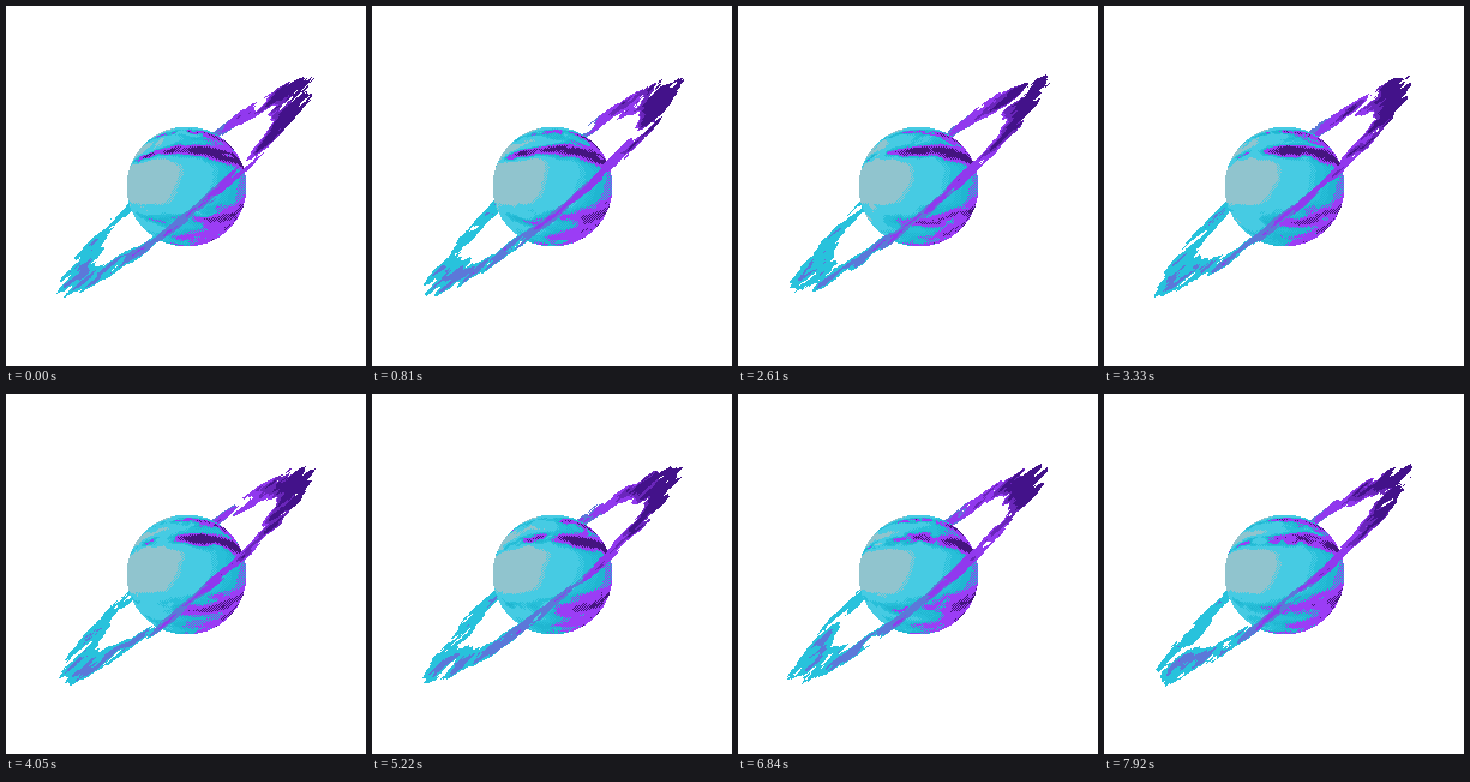
An HTML page with a canvas that plays this animation: 360x360 px, repeating every 8000 ms.

```html
<!DOCTYPE html>
<html lang="en">
<head>
<meta charset="utf-8">
<title>Ringed planet</title>
<style>
  html, body { margin: 0; width: 100%; height: 100%; overflow: hidden; background: #fff; }
  canvas { display: block; width: 360px; height: 360px; image-rendering: pixelated; }
</style>
</head>
<body>
<canvas id="stage" width="300" height="300"></canvas>
<script>
const SIZE = 300, LOOP = 8000, STEP = 90;
const PLANET = { pixels: 100, left: 100, scale: 10, seed: 6.314, drift: 0.8 };
const RING = { tilt: 0.7, width: 0.127, flatten: 6, scale: 15, seed: 8.461, spin: 0.5 };
const LIGHT = { x: -0.1, y: 0.3 };

// Cloud belts: centre, half-width and strength, by latitude from 0 (top) to 1.
const BELTS = [
  [0.17, 0.04, 1.4], [0.25, 0.05, 0.6], [0.332, 0.038, 2.5],
  [0.6, 0.02, 0.3], [0.66, 0.045, 1.05], [0.77, 0.05, 0.7], [0.9, 0.08, 0.6]
];

const rgb = hex => [1, 3, 5].map(i => parseInt(hex.slice(i, i + 2), 16));
const PLANET_COLORS = ['#90c4ce', '#46cbe3', '#28bfd9', '#20b6d1', '#9b3df5', '#45157f'].map(rgb);
const RING_COLORS = ['#28c2dc', '#5c78d9', '#9139ee', '#6a26bb', '#43128a'].map(rgb);

const ctx = document.getElementById('stage').getContext('2d');
const image = ctx.createImageData(SIZE, SIZE);

const fract = v => v - Math.floor(v);
const mod = (v, m) => v - m * Math.floor(v / m);
const smoothstep = (a, b, v) => {
  const t = Math.min(1, Math.max(0, (v - a) / (b - a)));
  return t * t * (3 - 2 * t);
};
const level = (v, limits) => limits.filter(limit => v >= limit).length;

function rotate(x, y, angle) {
  const c = Math.cos(angle), s = Math.sin(angle);
  return [x * c - y * s, x * s + y * c];
}

function makeNoise(scale, seed, octaves) {
  const rand = (x, y) =>
    fract(Math.sin(mod(x, 2 * scale) * 12.9898 + mod(y, scale) * 78.233) * 15.5453 * seed);

  function noise(x, y) {
    const ix = Math.floor(x), iy = Math.floor(y);
    const fx = x - ix, fy = y - iy;
    const u = fx * fx * (3 - 2 * fx), v = fy * fy * (3 - 2 * fy);
    const a = rand(ix, iy), b = rand(ix + 1, iy);
    const c = rand(ix, iy + 1), d = rand(ix + 1, iy + 1);
    return a + (b - a) * u + (c - a) * v * (1 - u) + (d - b) * u * v;
  }

  function fbm(x, y) {
    let sum = 0;
    for (let i = 0, gain = 0.5; i < octaves; i++, gain /= 2, x *= 2, y *= 2) {
      sum += noise(x, y) * gain;
    }
    return sum;
  }
  return { rand, fbm };
}

const clouds = makeNoise(PLANET.scale, PLANET.seed, 3);
const dust = makeNoise(RING.scale, RING.seed, 4);

function swirl(x, y) {
  const row = Math.floor(y);
  x += row * 0.31;
  const h = clouds.rand(Math.floor(x), row);
  const offset = 0.25 + h * 0.5;
  const dist = Math.hypot(fract(x) - offset, fract(y) - offset);
  return smoothstep(0, h * 0.25, dist * 0.75);
}

function turbulence(x, y, shift) {
  const k = PLANET.scale * 0.3;
  let sum = 0;
  for (let i = 11; i <= 20; i++) sum += swirl(x * k + i + shift, y * k + i);
  return sum;
}

const beltStrength = y => BELTS.reduce(
  (sum, [centre, width, power]) => sum + power * Math.exp(-(((y - centre) / width) ** 2)), 0.08);

function put(x, y, color) {
  const i = (y * SIZE + x) * 4;
  image.data[i] = color[0];
  image.data[i + 1] = color[1];
  image.data[i + 2] = color[2];
  image.data[i + 3] = 255;
}

function drawPlanet(time) {
  const { pixels, left, scale, drift } = PLANET;
  const shift = time * drift;
  for (let j = 0; j < pixels; j++) {
    for (let i = 0; i < pixels; i++) {
      const cx = i / pixels * 2 - 1, cy = j / pixels * 2 - 1;
      const r2 = cx * cx + cy * cy;
      if (r2 >= 1) continue;
      const z = Math.sqrt(1 - r2);
      const x = cx / (z + 1) / 2 + 0.5, y = cy / (z + 1) / 2 + 0.5;
      const lightDist = Math.hypot(i / pixels - LIGHT.x, j / pixels - LIGHT.y);

      const warp = clouds.fbm(x * scale, y * scale) + turbulence(x, y, shift);
      const cloud = clouds.fbm(x * scale + warp - shift, y * scale * 2 + warp) * beltStrength(y);
      let shade = smoothstep(-0.2, 4.3 - cloud - lightDist, cloud + lightDist * 1.8);
      if ((i + j) % 2 === 0) shade *= 1.1;
      put(left + i, left + j, PLANET_COLORS[level(shade, [0.25, 0.5, 0.625, 0.75, 1])]);
    }
  }
}

function drawRing(time) {
  const { tilt, width, flatten, scale, spin } = RING;
  for (let j = 0; j < SIZE; j++) {
    for (let i = 0; i < SIZE; i++) {
      const ux = i / SIZE, uy = j / SIZE;
      const [x, y] = rotate(ux - 0.5, uy - 0.5, tilt);
      const dist = Math.hypot(x, y * flatten);
      let ring = smoothstep(0.5 - width * 2, 0.5 - width, dist) * smoothstep(dist - width, dist, 0.4);
      const hidden = y < 0 && Math.hypot(x, y) < 1 / 6;
      if (ring < 0.28 || hidden) continue;

      const [rx, ry] = rotate(x, y * flatten, time * spin);
      ring *= dust.fbm((rx + 0.5) * scale, (ry + 0.5) * scale);
      if (ring < 0.28) continue;
      const shade = ring + 2 * ((ux - LIGHT.x) ** 2 + (uy - LIGHT.y) ** 2);
      put(i, j, RING_COLORS[level(shade, [1.1, 1.38, 1.75, 1.9])]);
    }
  }
}

let shown = -1;
function tick() {
  const step = Math.floor(performance.now() % LOOP / STEP);
  if (step !== shown) {
    shown = step;
    const time = step * STEP / 1000;
    image.data.fill(255);
    drawPlanet(time);
    drawRing(time);
    ctx.putImageData(image, 0, 0);
  }
  requestAnimationFrame(tick);
}
tick();
</script>
</body>
</html>
```
